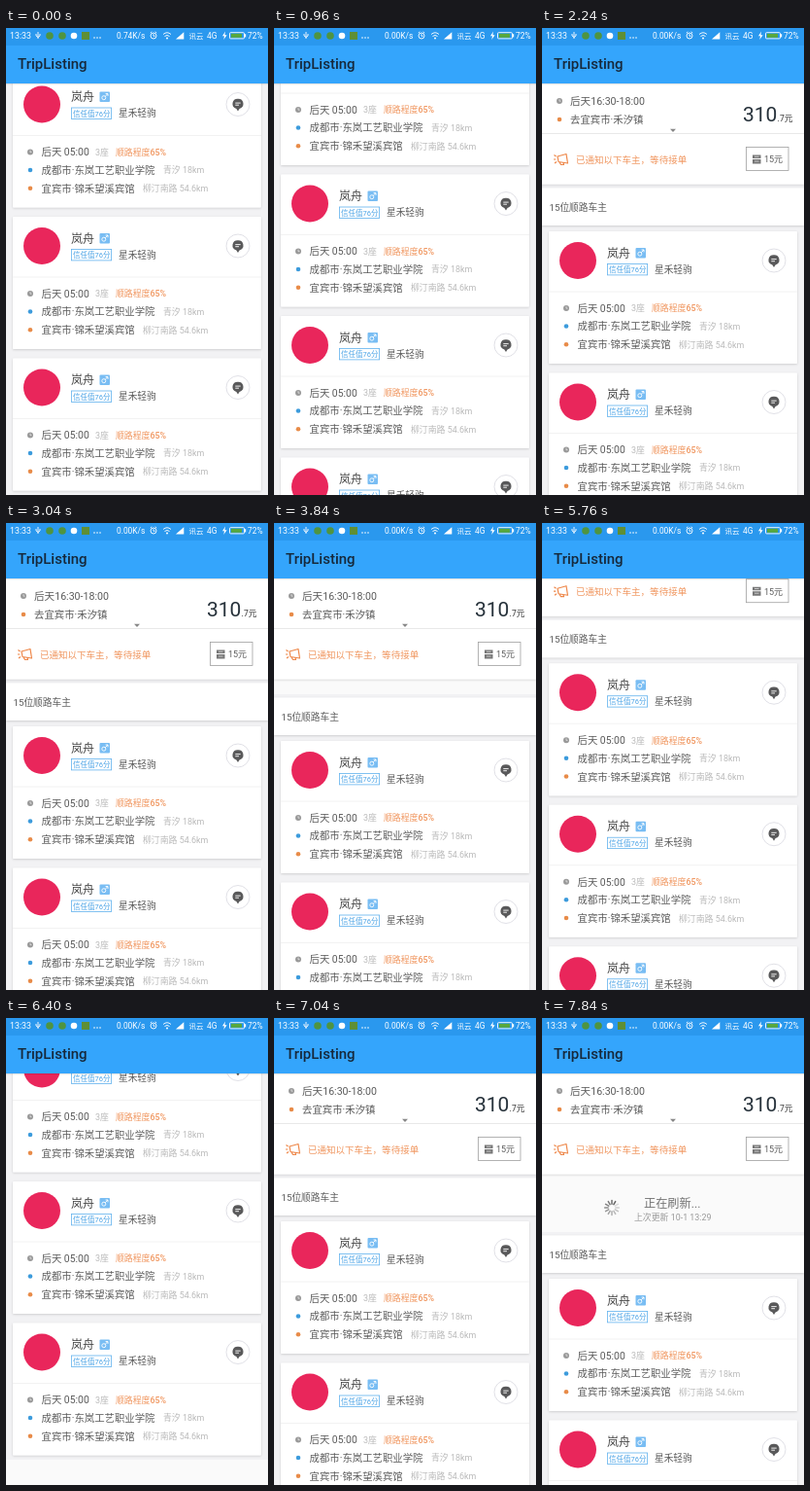
Write an HTML page that moves like this. It is 270x480 px and loops after 8000 ms.

```html
<!DOCTYPE html>
<html lang="zh-CN">
<head>
<meta charset="utf-8">
<title>Pull to refresh</title>
<style>
  html, body { margin: 0; width: 100%; height: 100%; overflow: hidden; background: #fafafa; }
  svg { display: block; width: 100%; height: 100%; }
  text { font-family: Roboto, "Noto Sans CJK SC", "Noto Sans CJK", sans-serif; font-size: 10.4px; fill: #5b5b5b; }
  .status text { font-size: 8.4px; fill: #fff; }
  .title { font-size: 15px; font-weight: 500; fill: #16283a; }
  .small { font-size: 8.9px; fill: #b9b9b9; }
  .label { font-size: 9.7px; }
  .orange { fill: #f0965f; }
  .white { fill: #fff; }
  .line { fill: none; stroke: #fff; stroke-width: .9; }
</style>
</head>
<body>
<svg viewBox="0 0 270 480" preserveAspectRatio="none">
  <defs>
    <filter id="shadow" x="-5%" y="-5%" width="110%" height="112%">
      <feDropShadow dx="0" dy=".8" stdDeviation="1" flood-opacity=".16"/>
    </filter>
    <g id="card">
      <rect x="7" width="256" height="136" rx="1" class="white" filter="url(#shadow)"/>
      <circle cx="37" cy="30" r="19" fill="#e9265b"/>
      <text x="67" y="26.5" style="font-size:12px;fill:#444">岚舟</text>
      <rect x="96.5" y="17" width="10.5" height="10.5" rx="1" fill="#79bdf3"/>
      <g class="line"><circle cx="100.8" cy="23.2" r="2"/><path d="M102.2 21.8L105 19M102.6 19H105V21.4"/></g>
      <rect x="67.4" y="33.5" width="41.2" height="11.4" fill="none" stroke="#62b2ee" stroke-width=".8"/>
      <text x="69" y="42" style="font-size:7.5px;fill:#4ba3e6">信任值76分</text>
      <text x="116" y="42.7" class="label">星禾轻驹</text>
      <circle cx="239" cy="30" r="12" fill="#fff" stroke="#d9d9e0" stroke-width=".8"/>
      <path d="M239 24.2a5.4 5.2 0 0 1 1.6 10.2L239 37L237.4 34.4A5.4 5.2 0 0 1 239 24.2" fill="#59595a"/>
      <path class="line" d="M236.3 28.6H241.7M236.3 30.7H240"/>
      <path d="M7 62H263" stroke="#efefef" stroke-width=".8"/>
      <circle cx="25" cy="79" r="3" fill="#999"/>
      <path class="line" d="M25 77.2V79.2H26.4" style="stroke-width:.6"/>
      <circle cx="25" cy="97.5" r="2.3" fill="#3c9bdc"/>
      <circle cx="25" cy="116.3" r="2.3" fill="#e88b48"/>
      <text x="36.5" y="82.9">后天 05:00</text>
      <text x="92" y="82.3" class="small">3座</text>
      <text x="113" y="82.3" class="small" style="font-weight:500;fill:#f0965f">顺路程度65%</text>
      <text x="36.5" y="101.4">成都市·东岚工艺职业学院</text>
      <text x="162" y="100.9" class="small">青汐 18km</text>
      <text x="36.5" y="120.3">宜宾市·锦禾望溪宾馆</text>
      <text x="141" y="119.8" class="small">柳汀南路 54.6km</text>
    </g>
  </defs>

  <!-- Stays in place; the list slides down to uncover it. -->
  <g id="refresh">
    <g id="spinner"></g>
    <text x="105" y="195" style="font-size:12.2px;fill:#737373">正在刷新...</text>
    <text x="95" y="207.7" class="small" style="fill:#999">上次更新 10-1 13:29</text>
  </g>

  <g id="list">
    <rect y="-48" width="270" height="625" fill="#f2f2f4"/>
    <rect y="-44.5" width="270" height="38.5" class="white" filter="url(#shadow)"/>
    <text x="7.5" y="-21" class="label">15位顺路车主</text>
    <g id="cards"></g>
  </g>

  <g id="panel">
    <rect y="50" width="270" height="110.5" class="white" filter="url(#shadow)"/>
    <circle cx="18" cy="75" r="3" fill="#999"/>
    <path class="line" d="M18 73.2V75.2H19.4" style="stroke-width:.6"/>
    <circle cx="18" cy="94" r="2.3" fill="#e88b48"/>
    <text x="29" y="78.9" style="font-size:10.6px">后天16:30-18:00</text>
    <text x="29" y="97.9">去宜宾市·禾汐镇</text>
    <text x="207" y="96" style="font-size:21px;fill:#26313a">310</text>
    <text x="242.6" y="96" style="font-size:8.7px;fill:#333">.7元</text>
    <path d="M0 108.5H270" stroke="#e2e2e2" stroke-width=".8"/>
    <path d="M132 103.8H138L135 107Z" fill="#888"/>
    <g fill="none" stroke="#ee8749" stroke-width="1.2" stroke-linejoin="round">
      <path d="M16 132L25 129.5L26.5 139L17 137.5ZM18 138L19.5 140.5H22.5L22 138.5"/>
      <path d="M12.5 130.5L14.5 132M12 135H14.3M13 139L15 137.5"/>
    </g>
    <text x="35" y="138.7" class="orange" style="font-size:9.53px">已通知以下车主，等待接单</text>
    <rect x="210.5" y="122.5" width="43.5" height="24" fill="#fff" stroke="#a0a0a0" stroke-width=".8"/>
    <path d="M217 130.5H225.5V134H217ZM217 135H225.5V139.5H217Z" fill="#777"/>
    <path class="line" d="M219 132.3H223.5M219 137H223.5" style="stroke-width:.6"/>
    <text x="229" y="138.3" style="font-size:9px">15元</text>
  </g>

  <rect width="270" height="57" fill="#34a5fc"/>
  <rect width="270" height="18" fill="#2a98ee"/>
  <rect y="57" width="270" height="1.2" fill="#000" opacity=".1"/>
  <text x="12" y="42" class="title">TripListing</text>
  <g class="status">
    <text x="4" y="11" style="font-size:8.8px">13:33</text>
    <path class="line" d="M33 4V11M31 6V8L33 9.5L35 8V6"/>
    <circle cx="45" cy="8" r="3.8" fill="#4f9440"/>
    <circle cx="58" cy="8" r="3.8" fill="#4f9440"/>
    <circle cx="70" cy="8" r="3.3" class="white"/>
    <rect x="78" y="4" width="8" height="8" fill="#5f8f35"/>
    <g class="white"><circle cx="91" cy="10" r=".8"/><circle cx="94" cy="10" r=".8"/><circle cx="97" cy="10" r=".8"/></g>
    <text id="speed" x="114" y="11"></text>
    <g class="line">
      <circle cx="152" cy="8" r="3"/>
      <path d="M152 6.2V8.3H153.5M148.8 5L150.3 3.8M155.2 5L153.7 3.8"/>
      <path d="M162 6.5Q166 3 170 6.5M163.5 8.5Q166 6.4 168.5 8.5"/>
    </g>
    <circle cx="166" cy="10.5" r="1" class="white"/>
    <path class="white" d="M175 11.5L183.3 4.3V11.5Z"/>
    <text x="188.5" y="10.8" style="font-size:7.4px">讯云</text>
    <text x="207" y="11">4G</text>
    <path class="white" d="M226 3.5L223 8.3H225L224.3 12L227.6 7.2H225.4Z"/>
    <rect x="230.5" y="4.7" width="15" height="6.2" rx="1" class="line"/>
    <rect x="246" y="6.2" width="1.2" height="3.2" class="white"/>
    <rect x="232" y="5.8" width="11" height="4" fill="#58a83c"/>
    <text x="249" y="11">72%</text>
  </g>
</svg>
<script>
const $ = id => document.getElementById(id);
const LOOP = 8000, STEP = 160, CARDS = 4, PITCH = 145.5;
const TOP = 209, BOTTOM = -97, REFRESHING = 269;

// [time in ms, y of the first card]
const path = [
  [0, BOTTOM], [960, 5], [1920, TOP], [3680, TOP], [3840, 224], [4320, 290],
  [4640, REFRESHING], [5280, REFRESHING], [5600, TOP], [6240, BOTTOM], [6400, -123],
  [6560, BOTTOM], [7040, TOP], [7440, 290], [7840, 268], [8000, 268]
];

const slope = i => (path[i + 1][1] - path[i][1]) / (path[i + 1][0] - path[i][0]);

// Monotone tangents keep the scroll from overshooting its stops.
function tangent(i) {
  if (i === 0 || i === path.length - 1) return 0;
  const a = slope(i - 1), b = slope(i);
  return a * b > 0 ? 2 * a * b / (a + b) : 0;
}

function scrollAt(t) {
  const i = path.findIndex((p, k) => k < path.length - 1 && t < path[k + 1][0]);
  const [t0, y0] = path[i], [t1, y1] = path[i + 1];
  const span = t1 - t0, u = (t - t0) / span, v = 1 - u;
  return y0 * (1 + 2 * u) * v * v + y1 * u * u * (3 - 2 * u)
    + span * u * v * (tangent(i) * v - tangent(i + 1) * u);
}

$('cards').innerHTML = Array.from({ length: CARDS }, (_, i) =>
  `<use href="#card" y="${i * PITCH}"/>`).join('');

$('spinner').innerHTML = Array.from({ length: 12 }, (_, i) =>
  `<path d="M0 -3.8V-7.4" stroke="#555" stroke-width="1.5" stroke-linecap="round"
    opacity="${0.2 + i * 0.065}" transform="rotate(${i * 30})"/>`).join('');

function draw(now) {
  const t = Math.floor(now % LOOP / STEP) * STEP;
  const y = scrollAt(t);
  $('list').setAttribute('transform', `translate(0 ${y})`);
  $('panel').setAttribute('transform', `translate(0 ${Math.min(0, y - TOP)})`);
  $('refresh').setAttribute('visibility', y > TOP ? 'visible' : 'hidden');
  $('spinner').setAttribute('transform', `translate(72 195) rotate(${t / STEP * 60})`);
  $('speed').textContent = t < 640 ? '0.74K/s' : '0.00K/s';
}

const start = performance.now();
function tick() {
  draw(performance.now() - start);
  requestAnimationFrame(tick);
}
tick();
</script>
</body>
</html>
```
